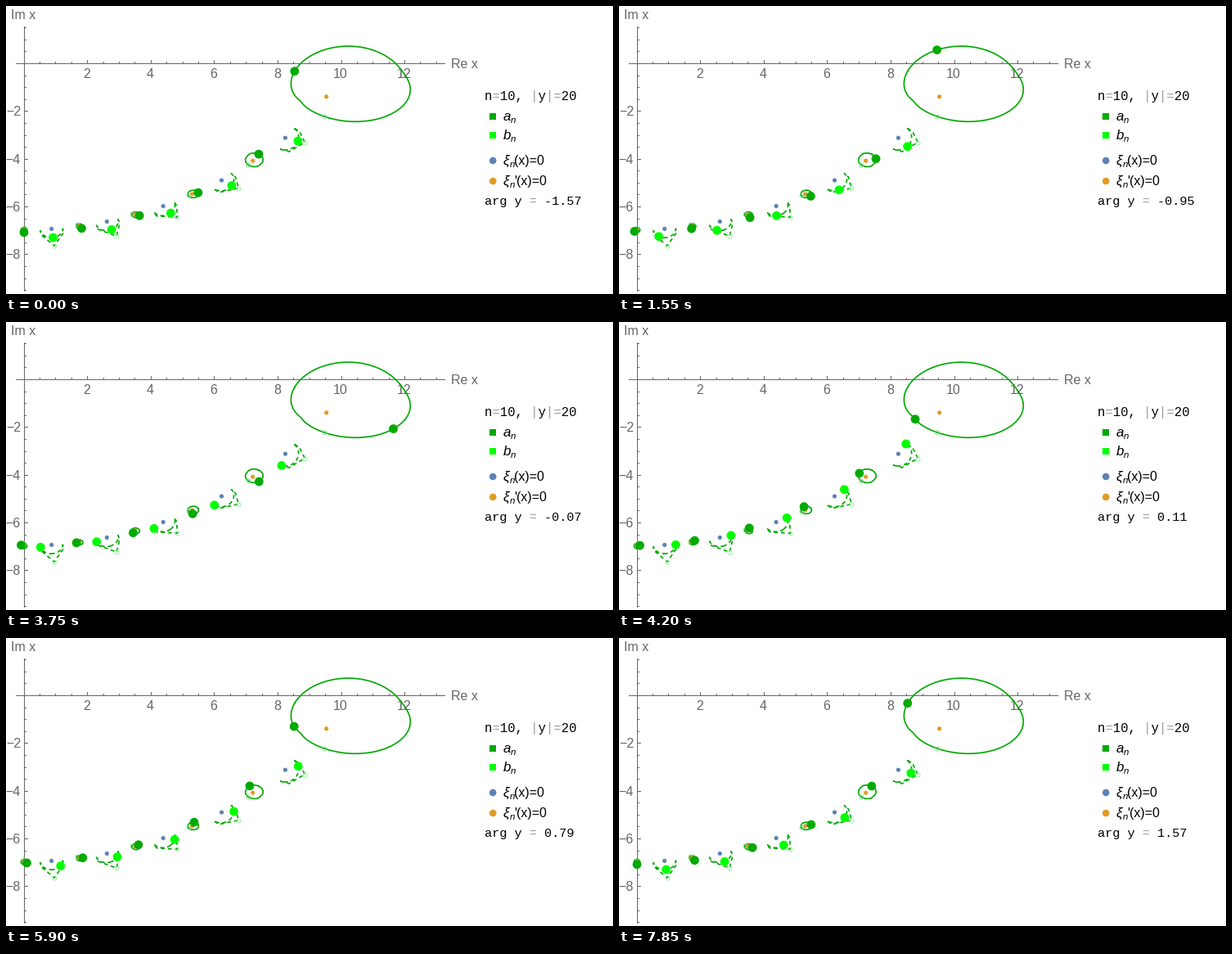
Animation of 742x352 px, one loop 7900 ms. Source, as a matplotlib script:

```python
"""Poles of the Mie coefficients a_n, b_n while arg y turns at fixed |y|."""
from math import factorial

import matplotlib.pyplot as plt
import numpy as np
from matplotlib.animation import FuncAnimation
from matplotlib.patches import Circle, Rectangle

W, H, DPI = 742, 352, 100
PT = 72 / DPI
N, RADIUS = 10, 20
FRAMES, STEP, SUB = 158, 0.02, 8
GREEN, LIME = (0, 2 / 3, 0), (0, 1, 0)
BLUE, ORANGE = "#5e81b5", "#e19c24"
GRAY = "0.4"


# Riccati-Bessel function: xi(x) = exp(ix) p(x) / x^N, xi' ~ q(x)
p = np.array([1j**k * factorial(N + k) / (factorial(k) * factorial(N - k) * 2**k)
              for k in range(N + 1)])
xp = np.append(p, 0)
q = np.polysub(np.polyadd(1j * xp, np.append(np.polyder(p), 0)), N * p)
x2p = np.append(xp, 0)


def log_derivative(y):
    """psi'(y) / psi(y) by downward recurrence."""
    d = 0
    for k in range(90, N, -1):
        d = k / y - 1 / (d + k / y)
    return d


def visible(roots, min_re=-0.2):
    return roots[(roots.real > min_re) & (abs(roots) < 14)]


def track(polys, min_re):
    """Follow the visible roots continuously through a list of polynomials."""
    paths = []
    for poly in polys:
        r = np.roots(poly)
        if not paths:
            paths.append(visible(r, min_re))
        else:
            near = abs(r[None, :] - paths[-1][:, None]).argmin(axis=1)
            paths.append(r[near])
    return np.array(paths)


args = -np.pi / 2 + STEP / SUB * np.arange((FRAMES - 1) * SUB + 1)
mid = len(args) // 2
y = RADIUS * np.exp(1j * args)
L = log_derivative(y)
a_path = track([np.polysub(A * x2p, q) for A in L / y], -0.2)
b_path = track([np.polysub(q, B * p) for B in L * y], 0.3)


def px(z):
    return 22 + 38.8 * np.real(z), 70.5 - 29.17 * np.imag(z)


fig = plt.figure(figsize=(W / DPI, H / DPI), dpi=DPI, facecolor="white")
ax = fig.add_axes([0, 0, 1, 1])
ax.axis("off")


def label(x, y, s, size=16, color="black", font="Liberation Sans", **kw):
    return ax.text(x, y, s, fontsize=size * PT, color=color, family=font,
                   va="baseline", **kw)


def mono(x, y, s, size=15.3, **kw):
    return label(x, y, s, size, font="Liberation Mono", **kw)


def two_tone(x, y, s, size=15.3):
    """Black text with its thin signs in pale gray."""
    mono(x, y, "".join(" " if c in "=|" else c for c in s), size)
    mono(x, y, "".join(c if c in "=|" else " " for c in s), size, color="0.62")


def dots(z, size, color, zorder):
    # one size per dot keeps the centres off the pixel grid
    area = np.full(len(z), (size * PT) ** 2)
    return ax.scatter(*px(z), s=area, color=color, lw=0, zorder=zorder)


def rule(xs, ys):
    """Crisp one-pixel line."""
    ax.plot(np.floor(xs) + 0.5, np.floor(ys) + 0.5, color=GRAY, lw=PT,
            zorder=1, solid_capstyle="projecting", snap=False)


# Axes
ox, oy = px(0)
rule([12, 536], [oy, oy])
rule([ox, ox], [25, 348])
for t in np.arange(0.5, 13.1, 0.5):
    x, _ = px(t)
    major = t % 2 == 0 and t < 13
    rule([x, x], [oy, oy - (4 if major else 2)])
    if major:
        label(x - 0.9, 88, f"{t:.0f}", color=GRAY, ha="center", zorder=1)
for t in np.arange(-9.5, 1.6, 0.5):
    _, v = px(1j * t)
    major = t % 2 == 0 and t != 0
    rule([ox, ox + (4 if major else 2)], [v, v])
    if major:
        label(18, v + 5.6, f"\u2212{-t:.0f}", color=GRAY, ha="right", zorder=1)
label(6.5, 16, "Im x", color=GRAY)
label(543.5, 76, "Re x", color=GRAY)

# Trajectories, zeros and the positions for real y
coarse = 12
for path, style in ((a_path, "-"), (b_path[mid % coarse::coarse], (0, (2.8, 2.2)))):
    for z in path.T:
        ax.plot(*px(np.append(z, z[0])), color=GREEN, lw=1.7 * PT, ls=style,
                dash_capstyle="butt", zorder=2)
for path, color in ((a_path, "#7fdc8f"), (b_path, "#8df09a")):
    ax.plot(*px(path[mid]), "o", ms=5 * PT, mfc="none", mec=color,
            mew=0.9 * PT, zorder=3)
dots(visible(np.roots(p)), 5.2, BLUE, 4)
dots(visible(np.roots(q)), 5.2, ORANGE, 4)

# Legend
two_tone(585, 115, "n=10, |y|=20", 15.6)
for v, color, name in ((135, GREEN, "a"), (158, LIME, "b")):
    ax.add_patch(Rectangle((591, v - 4), 8, 8, color=color, lw=0))
    label(608, v + 5, name, 17, style="italic")
    label(617, v + 8, "n", 11.5, style="italic")
for v, color, tail in ((189, BLUE, "(x)=0"), (214, ORANGE, "'(x)=0")):
    ax.add_patch(Circle((595.2, v), 4.3, color=color, lw=0))
    label(608, v + 5, "\u03be", 17, style="italic")
    label(615.5, v + 8, "n", 11.5, style="italic")
    label(621, v + 5, tail)
two_tone(585, 243, "arg y =")
value = mono(585, 243, "")

a_dots = dots(a_path[0], 10.8, GREEN, 6)
b_dots = dots(b_path[0], 10.8, LIME, 6)
ax.set_xlim(0, W)
ax.set_ylim(H, 0)


def update(i):
    for group, path in ((a_dots, a_path), (b_dots, b_path)):
        group.set_offsets(np.column_stack(px(path[i * SUB])))
    value.set_text(" " * 8 + f"{args[i * SUB]:.2f}")
    return a_dots, b_dots, value


anim = FuncAnimation(fig, update, frames=FRAMES, interval=50,
                     repeat=True, repeat_delay=0)
plt.show()
```
